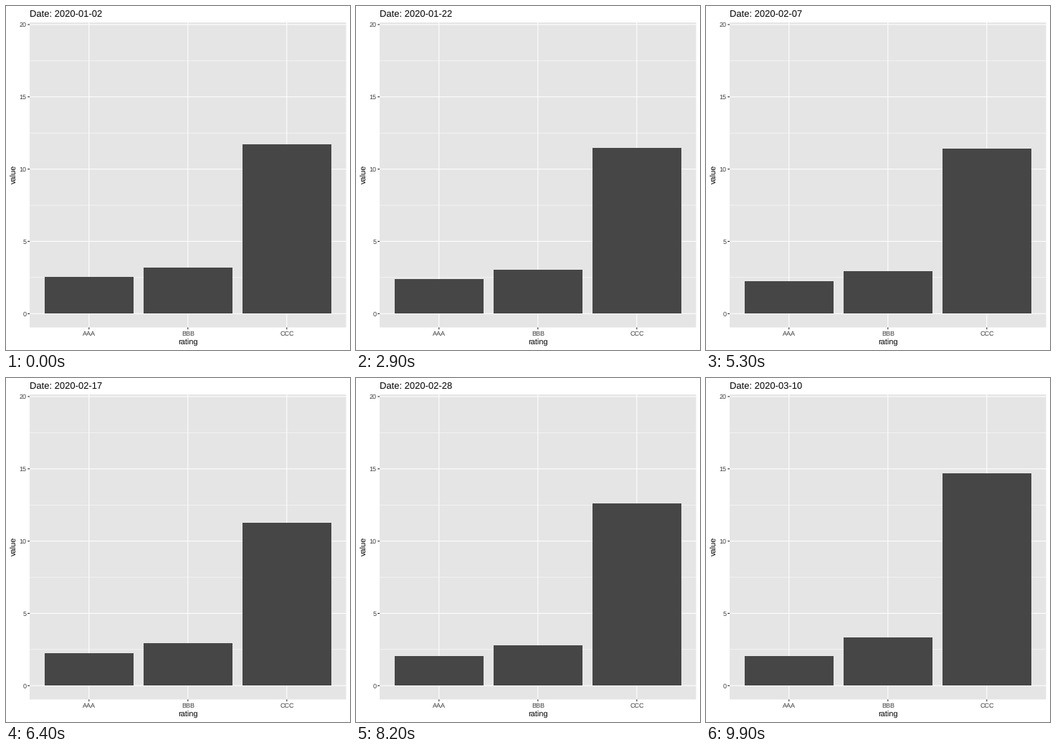
Write a matplotlib script that moves like this. It is 480x480 px and loops after 10 s.

```python
import numpy as np
import matplotlib.pyplot as plt
from matplotlib.animation import FuncAnimation
from matplotlib.patches import Rectangle

plt.rcParams["font.family"] = ["Liberation Sans", "DejaVu Sans"]
plt.rcParams["text.hinting"] = "none"

SIZE, DPI = 480, 96
PX = 72 / DPI                       # points per pixel
LEFT, RIGHT, TOP, BOTTOM = 33, 474.5, 23, 448.5
ZERO, UNIT = 429.3, 20.17           # y of value 0, pixels per unit
STEP, BAR_WIDTH = 138, 124
PANEL, BAR, TICK, LABEL = "#e5e5e5", "#464646", "#252525", "#3c3c3c"
TITLE_PX, AXIS_PX, TICK_PX = 13, 11, 9

# Weekdays plus the month end that falls on a Saturday
span = np.arange("2020-01-02", "2020-03-12", dtype="datetime64[D]")
days = span[np.is_busday(span) | (span == np.datetime64("2020-02-29"))]

# Turning points of each rating, by day index
TURNS = [0, 6, 11, 12, 14.5, 21, 22, 26.5, 30, 32, 36.5, 41, 47, 49.5]
LEVELS = {
    "AAA": [2.54, 2.49, 2.50, 2.50, 2.40, 2.29, 2.29, 2.25, 2.27, 2.27,
            2.19, 2.05, 1.80, 2.05],
    "BBB": [3.19, 3.14, 3.12, 3.12, 3.04, 2.94, 2.94, 2.94, 2.93, 2.93,
            2.84, 2.79, 2.68, 3.34],
    "CCC": [11.72, 11.47, 11.28, 11.28, 11.47, 11.76, 11.76, 11.42, 11.28,
            11.28, 11.62, 12.61, 13.20, 14.69],
}

fig = plt.figure(figsize=(SIZE / DPI, SIZE / DPI), dpi=DPI, facecolor="white")
ax = fig.add_axes([0, 0, 1, 1])
ax.set(xlim=(0, SIZE), ylim=(SIZE, 0))
ax.axis("off")


def y_of(value):
    return ZERO - UNIT * value


def line(x, y, color, width, z):
    ax.plot(x, y, color=color, lw=width * PX, solid_capstyle="butt",
            snap=False, zorder=z)


def text(x, y, s, size, color="black", ha="center", rotation=0):
    return ax.text(x, y, s, fontsize=size * PX, color=color, ha=ha,
                   va="baseline", rotation=rotation, rotation_mode="anchor")


ax.add_patch(Rectangle((LEFT, TOP), RIGHT - LEFT, BOTTOM - TOP, fc=PANEL,
                       ec="none", snap=False, zorder=0))
for v in np.arange(2.5, 20, 5):
    line([LEFT, RIGHT], [y_of(v)] * 2, "white", 0.53, 1)
for v in range(0, 21, 5):
    line([LEFT, RIGHT], [y_of(v)] * 2, "white", 1.07, 2)
    line([LEFT - 2.75, LEFT], [y_of(v)] * 2, TICK, 1.07, 2)
    text(28.3, y_of(v) + 3.2, str(v), TICK_PX, LABEL, ha="right")

bars = {}
for i, name in enumerate(LEVELS):
    x = 115.8 + STEP * i
    line([x, x], [TOP, BOTTOM], "white", 1.07, 2)
    line([x, x], [BOTTOM, BOTTOM + 2.75], TICK, 1.07, 2)
    text(x + 0.6, 460, name, TICK_PX, LABEL)
    bars[name] = ax.add_patch(
        Rectangle((round(x - BAR_WIDTH / 2), 0), BAR_WIDTH, 0, fc=BAR,
                  ec="none", zorder=3))

text((LEFT + RIGHT) / 2, 473, "rating", AXIS_PX)
text(14.4, (TOP + BOTTOM) / 2 - 0.8, "value", AXIS_PX, rotation=90)
title = text(LEFT, 15, "", TITLE_PX, ha="left")


def update(frame):
    # Two steps per day: the day itself, then halfway to the next
    floor = round(ZERO)
    for name, bar in bars.items():
        top = round(y_of(np.interp(frame / 2, TURNS, LEVELS[name])))
        bar.set_y(top)
        bar.set_height(floor - top)
    title.set_text(f"Date: {days[frame // 2]}")
    return [*bars.values(), title]


anim = FuncAnimation(fig, update, frames=100, interval=100, repeat=True,
                     repeat_delay=0, blit=False)
plt.show()
```
